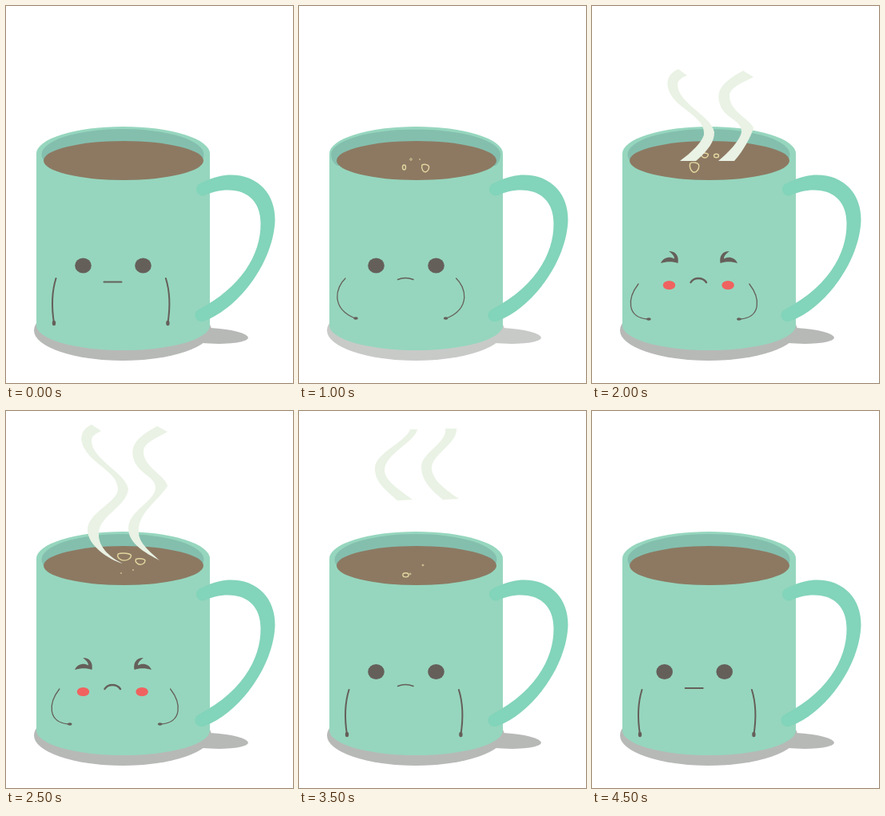
Animation, 359 px wide and 472 px high, one loop 5 s. Source, as an HTML page:

```html
<!DOCTYPE html>
<html lang="en">
<head>
<meta charset="utf-8">
<title>Hot mug</title>
<style>
html, body { margin: 0; width: 100%; height: 100%; overflow: hidden; background: #fff; }
svg { display: block; width: 100%; height: 100%; }
</style>
</head>
<body>
<svg viewBox="0 0 359 472">
  <defs>
    <clipPath id="air"><rect y="17" width="359" height="177"/></clipPath>
  </defs>
  <g id="shadow">
    <ellipse cx="146" cy="406" rx="111" ry="38"/>
    <ellipse cx="255" cy="412.8" rx="48" ry="9.8" transform="rotate(3 255 412.8)"/>
  </g>
  <path fill="#96d6be" d="M38 185A108.5 34 0 0 1 255 185V400A108.5 31 0 0 1 38 400Z"/>
  <path fill="#82d4ba" d="M243 222C262 213 272 211.5 281 211.5C316 211.5 337 236 336.5 268C335 318 294 377 248 394.5A7.5 7.5 0 0 1 241 380C293 353 319 312 318.5 272C318.5 246 303 230.5 278 230.5C266 230.5 258 233 249 237A8 8 0 0 1 243 222Z"/>
  <path id="wideRim" fill="#84bfae" d="M40 186A106 31.5 0 0 1 252 186Q252 195 246 200H48Q40 195 40 186Z"/>
  <ellipse id="rim" fill="#84bfae" cx="146" cy="186" rx="101.5" ry="32"/>
  <ellipse cx="147" cy="193.5" rx="100" ry="24.5" fill="#8d7962"/>
  <g id="bubbles" fill="none" stroke="#e3d8a0" stroke-width="1.4"></g>
  <g id="steam" fill="#e9f2e4" clip-path="url(#air)"></g>
  <g id="face"></g>
</svg>
<script>
const INK = '#655f5a', RED = '#f0625f', FADED = '#c39a8c';
const get = id => document.getElementById(id);
const mirror = (shape, axis) => shape + `<g transform="matrix(-1 0 0 1 ${2 * axis} 0)">${shape}</g>`;
const move = (shape, x, y) => `<g transform="translate(${x} ${y})">${shape}</g>`;
const oval = (x, y, rx, ry, attrs = '') => `<ellipse cx="${x}" cy="${y}" rx="${rx}" ry="${ry}" ${attrs}/>`;
const line = (d, width) => `<path d="${d}" fill="none" stroke="${INK}" stroke-width="${width}" stroke-linecap="round"/>`;
const fill = d => `<path d="${d}" fill="${INK}"/>`;

// Facial parts
const arm = (d, x, y, width, rx, ry) => line(d, width) + oval(x, y, rx, ry, `fill="${INK}"`);
const straightArms = mirror(arm('M62.5 341Q55 365 60 397', 60, 397, 2, 2.2, 3.2), 131.2);
const wideArms = mirror(arm('M58 341C46 352 39 378 70 391', 71, 391, 1.3, 2.8, 1.8), 127.3);
const raisedArms = mirror(arm('M58 348C44 366 43 390 70 392', 71, 392, 1.3, 2.8, 1.8), 127.4);
const loweredArms = mirror(arm('M67 348C55 360 49 382 79 398', 80, 398.5, 1.3, 2.8, 1.8), 136.2);
const eyes = (ry = 9.6) => mirror(oval(96.5, 325, 10.3, ry, `fill="${INK}"`), 134);
const squint = mirror(fill('M96 307C105 307 109 313 107.5 322C102 320 94 319.5 86 322C89 315 97 313 103 316.5C103 312.5 100 310 96 307Z'), 134);
const halfEyes = mirror(fill('M95 332.5A10.3 9.6 0 1 1 111 332.5Q103 330.5 95 332.5Z'), 140.3);
const cheeks = (y, color) => mirror(oval(96.5, y, 7.7, 5.5, `fill="${color}"`), 133.3);
const flatMouth = line('M122.5 345.5H144.5', 2);
const slightFrown = y => line(`M123.5 ${y}Q133 ${y - 4} 143 ${y}`, 1.5);
const frown = line('M123.5 346C127.5 339.3 138.5 339.3 143 346', 2.4);
const upset = squint + cheeks(349.5, RED) + frown;

// Steam ribbons
const rising = [
  'M108 79C92 86 90 101 103 117C116 132 142 142 140 161C138 170 124 184 110 194H130C146 180 153 170 153 158C150 138 107 122 107 98C107 93 113 89 119 87Z',
  'M189 81C165 94 154 105 160 123C166 141 186 142 187 156C187 167 170 184 158 194H178C190 180 198 165 202 153C200 143 171 132 172 112C172 102 190 95 202 89Z'];
const tall = [
  'M107 17C92 24 90 38 103 54C116 70 140 79 140 98C139 115 102 127 102 149C102 168 128 186 146 191C131 184 116 171 116 155C115 131 150 121 153 98C150 77 107 61 107 37C107 31 113 28 119 25Z',
  'M189 19C165 32 154 43 160 61C166 79 187 82 187 96C187 113 153 125 153 147C153 166 175 178 192 187C180 176 166 165 166 152C164 128 190 113 202 94C200 81 171 70 172 50C172 40 190 33 202 26Z'];
const swaying = [
  'M127 22L140 17C147 20 153 28 153 38C153 60 107 76 107 97C107 112 146 132 146 151C144 168 120 184 101 192C120 180 132 166 132 152C132 135 95 120 95 97C95 80 141 62 140 39C140 31 135 25 127 22Z',
  'M153 24L166 19C182 28 197 38 197 52C193 68 165 80 166 97C167 115 202 128 202 147C196 162 178 180 164 187C175 178 188 166 188 154C188 135 153 120 153 97C153 82 185 72 184 54C184 42 163 32 153 24Z'];
const leaving = [
  'M139 23H148C146 38 107 54 107 74C107 88 128 100 142 111L123 112C110 100 95 90 95 72C95 52 133 40 139 23Z',
  'M183 22H197C199 40 165 55 166 72C167 88 186 100 200 110L180 111C168 101 153 88 153 70C153 52 186 40 183 22Z'];

// Bubbles are [x, y, rx, ry]; large ones are lopsided.
const bubble = ([x, y, rx, ry]) => rx < 4.3 ? oval(x, y, rx, ry, rx < 2 ? 'stroke-width=".8"' : '') :
  `<path transform="translate(${x} ${y}) scale(${rx} ${ry})" vector-effect="non-scaling-stroke"
    d="M-.9-.8C-.3-1.2 1-.9 1-.3C1 .5 .4 1 0 1C-.5 1-1.2 .2-.9-.8Z"/>`;

const poses = [
  { face: straightArms + eyes() + flatMouth },
  { pale: true, face: straightArms + eyes() + flatMouth,
    bubbles: [[131, 202, 1.2, 1.5], [157, 203, 1, 1]] },
  { pale: true, wide: true, face: wideArms + eyes() + slightFrown(342.5),
    bubbles: [[140, 192, 1.3, 1.3], [151, 192, .5, .5], [131.5, 202, 2, 3], [158, 203, 4.6, 4.8]] },
  { face: raisedArms + eyes() + cheeks(349.5, FADED) + frown, steam: rising, lift: 67,
    bubbles: [[138, 189, 2.5, 2], [154, 190, 2, 1.6], [129, 203, 4, 4]] },
  { face: raisedArms + upset, steam: rising,
    bubbles: [[141, 187, 4.4, 3], [155.5, 187.5, 3, 2.2], [128, 202, 5.8, 6.2]] },
  { face: move(raisedArms, 8.8, 0) + move(upset, 0, 2), steam: tall,
    bubbles: [[148, 182.5, 8.5, 4.6], [168, 188.5, 6, 3.8], [144, 203, .6, .6], [159, 199, .6, .6]] },
  { face: loweredArms + halfEyes + move(cheeks(351, FADED), 6.5, 0) + move(frown, 6.5, 2), steam: swaying,
    bubbles: [[122, 186.5, 6.5, 3.8], [158, 188, 9.5, 6], [133, 204, 3.6, 2.5], [146, 200, 1.8, 2.5]] },
  { face: move(straightArms, 0, 8) + move(eyes(), 0, 1.5) + slightFrown(344.5), steam: leaving,
    bubbles: [[133.5, 205.3, 3.6, 2.6], [139, 204, 1, 1], [155, 193, 1.2, .8]] },
  { face: move(straightArms, 0, 8) + move(eyes(5), -5.8, 1.5) + move(flatMouth, -5.8, 1.5),
    steam: leaving, lift: -56 },
  { face: move(straightArms, 0, 8) + move(eyes() + flatMouth, -5.8, 1.5) }
];

let shown = -1;
function show(index) {
  if (index === shown) return;
  shown = index;
  const { face, pale, wide, bubbles = [], steam = [], lift = 0 } = poses[index];
  get('face').innerHTML = face;
  get('bubbles').innerHTML = bubbles.map(bubble).join('');
  get('steam').innerHTML = move(steam.map(d => `<path d="${d}"/>`).join(''), 0, lift);
  get('shadow').setAttribute('fill', pale ? '#c8cac8' : '#b7b9b7');
  get('wideRim').style.display = wide ? '' : 'none';
  get('rim').style.display = wide ? 'none' : '';
}

const start = performance.now();
function tick() {
  show(Math.floor((performance.now() - start) % 5000 / 500));
  requestAnimationFrame(tick);
}
tick();
</script>
</body>
</html>
```
